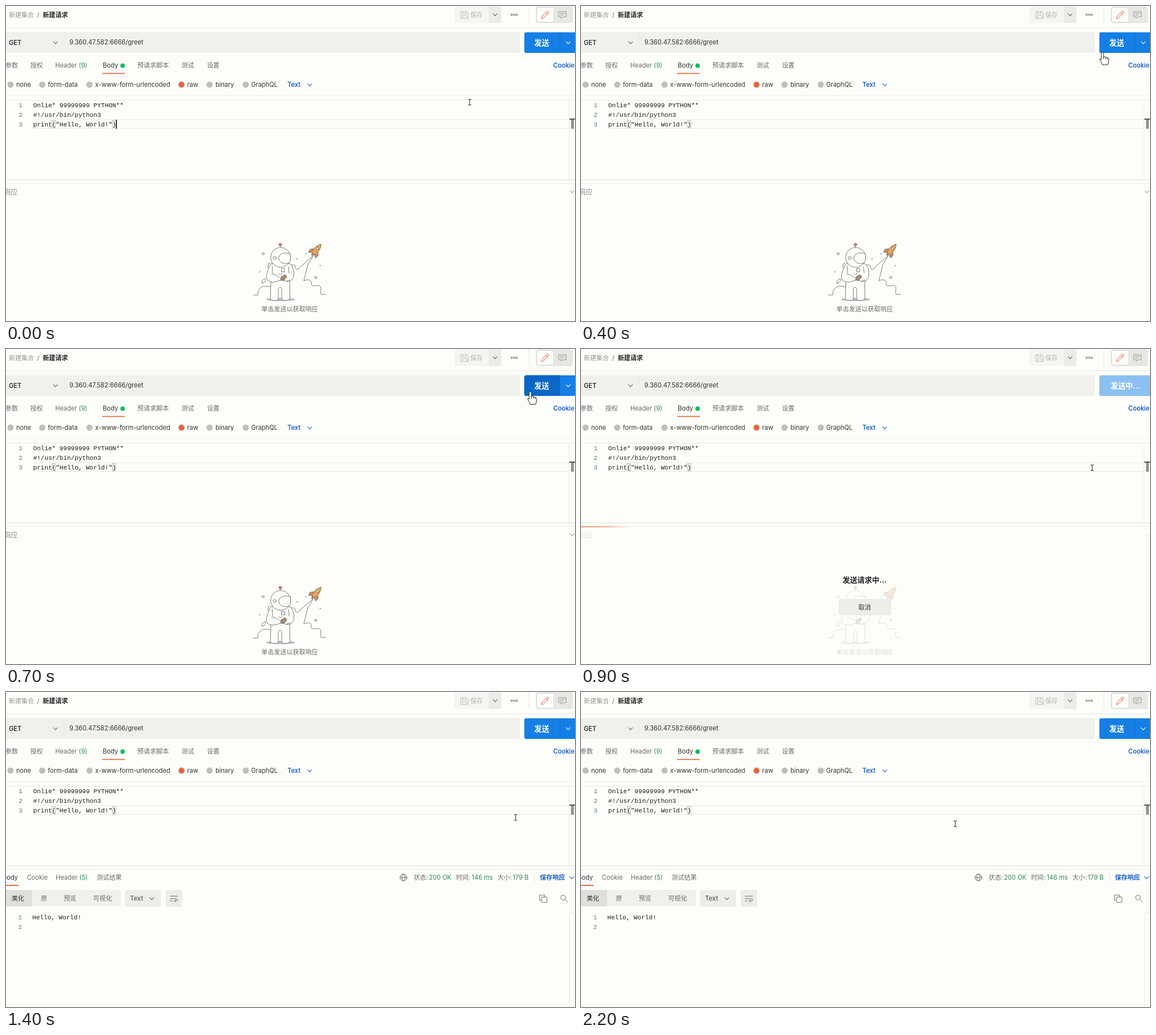
An HTML page for the animation above (2900 ms loop, 1005 by 557 pixels).

```html
<!DOCTYPE html>
<html lang="zh-CN">
<head>
<meta charset="utf-8">
<title>API request</title>
<style>
html, body { margin: 0; width: 100%; height: 100%; overflow: hidden; background: #fdfdfa; }
svg { display: block; width: 1005px; height: 557px; }
text { font: 11.1px Inter, "Noto Sans CJK SC", "Noto Sans CJK", sans-serif; fill: #6b6b6b; white-space: pre; }
.b { font-weight: 600; }
.dark { fill: #333; }
.pale { fill: #b4b4b2; }
.green { fill: #2f8a58; }
.blue { fill: #1b62c4; font-weight: 600; }
.code text { font-family: "Liberation Mono", "Noto Sans Mono", monospace; fill: #1c1c1c; }
.code .num { fill: #4b7f8c; }
.big { font-size: 13.2px; font-weight: 700; }
.white { fill: #fff; }
.mid { text-anchor: middle; }
.line { fill: none; stroke: #6b6b6b; stroke-width: 1; stroke-linecap: round; stroke-linejoin: round; }
.rule { fill: none; stroke: #e8e8e4; }
.field { fill: #f0f0ed; }
.accent { fill: #ea6a3c; }
.ink { fill: #fdfdfa; stroke: #6c6c6c; stroke-width: .9; stroke-linecap: round; stroke-linejoin: round; }
.open { fill: none; }
</style>
</head>
<body>
<svg viewBox="0 0 1005 557">
<defs>
  <path id="chev" d="M-3.5-1.8 0 1.8 3.5-1.8" fill="none" stroke-width="1.1" stroke-linecap="round" stroke-linejoin="round"/>
  <linearGradient id="glow">
    <stop offset="0" stop-color="#f2a58a"/>
    <stop offset=".45" stop-color="#f5b9a4"/>
    <stop offset="1" stop-color="#fdfdfa"/>
  </linearGradient>
</defs>

<!-- title row -->
<text x="5" y="20" style="fill:#969694">新建集合</text>
<text x="55" y="20">/</text>
<text x="65" y="20" class="b" style="fill:#222">新建请求</text>
<rect x="792" y="1" width="83" height="29" rx="3" fill="#f5f5f3"/>
<path d="M853 1h19a3 3 0 0 1 3 3v23a3 3 0 0 1-3 3h-19z" fill="#ebebe8"/>
<path class="line" style="stroke:#bcbcba" d="M803.500 10h10l3 3v9h-13zM806.500 10v4h6v-4M806 22v-5h8v5"/>
<text x="820" y="20" class="pale">保存</text>
<use href="#chev" x="864" y="15.500" stroke="#666"/>
<g class="line"><circle cx="893" cy="15.500" r="1.500"/><circle cx="897.500" cy="15.500" r="1.500"/><circle cx="902" cy="15.500" r="1.500"/></g>
<path class="rule" d="M923.500 0V30M0 38.500H1005"/>
<rect x="936.500" y="1.500" width="64" height="28" rx="3" fill="#e7e7e4" stroke="#dededb"/>
<rect x="937.500" y="2.500" width="30" height="26" rx="3" fill="#fdfdfa" stroke="#dcdcd9"/>
<path class="line" style="stroke:#e2613c" d="M946 22l1-4 8.500-8.500q1.500-1 2.500 0t0 2.500L949.500 21zM953.500 11.500l3 3"/>
<path class="line" style="stroke:#9a9a98" d="M976.500 10h13v9h-6l-3 3v-3h-4zM979 13h8M979 16h5"/>

<!-- address row -->
<rect x="-4" y="46" width="912" height="37" rx="3" class="field"/>
<path class="rule" d="M102.500 47v35"/>
<text x="5" y="69" class="b dark">GET</text>
<use href="#chev" x="87.500" y="65" stroke="#666"/>
<text x="112" y="68" class="dark">9.360.47.582:6666/greet</text>
<rect id="button" x="915.500" y="46.500" width="94" height="36.500" rx="3"/>
<g id="idle">
  <path id="hover" d="M918.500 46.500h59.500v36.500h-59.500a3 3 0 0 1-3-3V49.500a3 3 0 0 1 3-3z" fill="#0a67c8"/>
  <path d="M978.500 46.500v36.500" stroke="#1170d0"/>
  <text x="933" y="69.500" class="big white">发送</text>
  <use href="#chev" x="993" y="65" stroke="#fff"/>
</g>
<text id="busy" x="935.500" y="69.500" class="big white">发送中...</text>

<!-- request tabs -->
<text x="-1" y="109">参数</text>
<text x="43" y="109">授权</text>
<text x="87" y="109">Header <tspan class="green">(9)</tspan></text>
<text x="171" y="109" class="dark">Body</text>
<circle cx="206" cy="105.500" r="4" fill="#10c05c"/>
<rect x="170" y="118.500" width="40" height="1.700" class="accent"/>
<text x="232" y="109">预请求脚本</text>
<text x="310" y="109">测试</text>
<text x="355" y="109">设置</text>
<text x="966.500" y="109" class="blue">Cookie</text>
<g fill="#bebebb">
  <circle cx="8" cy="139" r="5.500"/><circle cx="64" cy="139" r="5.500"/><circle cx="147.500" cy="139" r="5.500"/>
  <circle cx="310" cy="139" r="6"/><circle cx="359.500" cy="139" r="5.500"/><circle cx="423.500" cy="139" r="5.500"/>
</g>
<circle cx="310" cy="139" r="4.600" fill="#f0602e"/>
<text x="18" y="143" class="dark">none</text>
<text x="74" y="143" class="dark">form-data</text>
<text x="157.500" y="143" class="dark">x-www-form-urlencoded</text>
<text x="320" y="143" class="dark">raw</text>
<text x="370" y="143" class="dark">binary</text>
<text x="433" y="143" class="dark">GraphQL</text>
<text x="497" y="143" class="blue">Text</text>
<use href="#chev" x="536.500" y="139.500" stroke="#1b62c4"/>

<!-- editor -->
<path class="rule" d="M0 158.500H1005" opacity=".6"/>
<path class="rule" d="M0 166.500H1005M994.500 167V307"/>
<path class="rule" d="M48 201H994M48 216.500H994"/>
<path class="rule" d="M0 307.500H1005" style="stroke:#dededb"/>
<path class="rule" d="M0 313.500H1005"/>
<g fill="#f3f6ee" stroke="#b8c2b4"><rect x="81.500" y="202.500" width="6" height="13"/><rect x="188" y="202.500" width="6" height="13"/></g>
<g class="code">
  <text x="22.500" y="179" class="num">1</text><text x="48" y="179">Onlie* 99999999 PYTHON**</text>
  <text x="22.500" y="195.500" class="num">2</text><text x="48" y="195.500">#!/usr/bin/python3</text>
  <text x="22.500" y="212.500" class="num">3</text><text x="48" y="212.500">print("Hello, World!")</text>
</g>
<path d="M995 199h10v2h-10z" fill="#555"/>
<path d="M998 201h5v16h-5z" fill="#929290"/>
<path id="caret" d="M195 201v16" stroke="#111" stroke-width="1.600"/>

<!-- empty response -->
<g id="empty">
  <text x="-5" y="333" style="font-size:12.800px;fill:#949492">响应</text>
  <use href="#chev" x="1000" y="328.500" stroke="#a4a4a2"/>
  <ellipse cx="485" cy="519" rx="26" ry="2.700" fill="#b7b6c4"/>
  <g class="ink">
    <path class="open" d="M437 511h8c-1-8 3-13 9-15 5-1 9-1 13 1M504 458c4-1 7 0 7 4 0 3 2 4 5 3l27-24M543 441l-10 17-7 28c4-2 10-3 12 0 3 4-1 8 4 9 6 0 11-3 14 2 1 5-2 10 1 13h8"/>
    <path d="M468 486l-1 29q0 5 4 5.500h6q4 0 4-5v-13q0-5 3-5t3 5v13q0 5 4 5h6q4-.5 4.500-5.500L501 485z"/>
    <path d="M468 456c-4 5-5 10-7 16-2 8-1 13 4 15 7 3 15 0 23-4 4 4 10 5 15 3 6-4 6-12 5-18-1-5-3-9-6-12z"/>
    <path class="open" d="M467 454l-4 2v7M470 459l1 13M499 461l1 11M469 474c6 0 10 3 14 6M495 487l7-3"/>
    <rect x="487" y="464" width="5" height="6"/>
    <path d="M486 479l7-4 3 4-6 7-5-3z" fill="#a98871"/>
    <path class="open" d="M482 473l3 3M486 472l1 3M484.500 424v4"/>
    <circle cx="484.500" cy="422" r="2.500" fill="#e98079"/>
    <circle cx="485" cy="444.500" r="17.500"/>
    <path d="M502 438c-7-2-14-2-18 2-4 5-2 11 3 14 5 2 10 2 14-1 2-5 2-10 1-15z"/>
    <circle cx="474.500" cy="445.500" r="2.700"/>
    <circle cx="454" cy="438" r="2"/>
    <circle cx="547" cy="480" r="2"/>
    <path d="M452 490c-1-4 2-7 6-8 1 4-1 8-6 8z"/>
    <g transform="translate(547.500 432) rotate(40)">
      <path d="M-4 0l-5 5 1 6 4-3zM4 0l5 5-1 6-4-3z" fill="#de8a5e"/>
      <path d="M0-14C5-8 5.500 1 3.500 8h-7C-5.500 1-5-8 0-14z" fill="#e9a555"/>
      <circle cy="-4" r="2"/>
      <path d="M-2 8l2 4 2-4z" fill="#de8a5e"/>
    </g>
  </g>
  <g fill="#777"><circle cx="448" cy="470" r="1"/><circle cx="514" cy="447" r="1"/><circle cx="530" cy="438" r="1"/><circle cx="555" cy="459" r="1"/></g>
  <text x="501" y="540" class="mid">单击发送以获取响应</text>
</g>

<g id="sending">
  <rect id="bar" y="313" width="95" height="2.500" fill="url(#glow)"/>
  <text x="501" y="413" class="big mid" style="fill:#222;font-size:13px">发送请求中...</text>
  <rect x="455" y="442" width="93" height="29" rx="3" fill="#ededea"/>
  <text x="501" y="460.500" class="mid dark">取消</text>
</g>

<!-- received response -->
<g id="result">
  <text x="-6" y="332" class="dark">Body</text>
  <rect y="341" width="22" height="2" class="accent"/>
  <text x="37" y="332">Cookie</text>
  <text x="88" y="332">Header <tspan class="green">(5)</tspan></text>
  <text x="160" y="332">测试结果</text>
  <g class="line"><circle cx="702" cy="328" r="6"/><ellipse cx="702" cy="328" rx="2.700" ry="6"/><path d="M696 328h12"/></g>
  <text x="720" y="332">状态:</text><text x="747" y="332" class="green">200 OK</text>
  <text x="795" y="332">时间:</text><text x="822.500" y="332" class="green">146 ms</text>
  <text x="868" y="332">大小:</text><text x="895" y="332" class="green">179 B</text>
  <path class="rule" d="M933.500 319v19M995.500 557V390.500H1005"/>
  <text x="943" y="332" class="blue">保存响应</text>
  <use href="#chev" x="999" y="328.500" stroke="#1b62c4"/>
  <rect x="-4" y="350" width="207" height="29" rx="3" class="field"/>
  <path d="M0 350h46v29H0z" fill="#dfdfdc"/>
  <text x="10" y="368.500" class="dark" style="font-weight:500">美化</text>
  <text x="61.500" y="368.500">原</text>
  <text x="102" y="368.500">预览</text>
  <text x="154" y="368.500">可视化</text>
  <rect x="210" y="350" width="63.500" height="30" rx="3" fill="#ededea"/>
  <text x="219" y="369" class="b">Text</text>
  <use href="#chev" x="257.500" y="365.500" stroke="#666"/>
  <rect x="282" y="350" width="29" height="30" rx="3" fill="#ededea"/>
  <path class="line" d="M290 361h13M290 365.500h10.500q2.500 0 2.500 2t-2.500 2H298M299.500 367.500l-2 2 2 2M290 369.500h4"/>
  <g class="line"><path d="M945 368h-2.500v-9h9v2.500"/><rect x="946" y="362.500" width="9.500" height="9.500" rx="1"/><circle cx="984" cy="363.500" r="4.300"/><path d="M987.500 367l4.500 4.500"/></g>
  <g class="code">
    <text x="21.500" y="402" class="num">1</text><text x="46.500" y="402">Hello, World!</text>
    <text x="21.500" y="418.500" class="num">2</text>
  </g>
</g>

<!-- pointer shapes, hot spot at 0,0 -->
<g id="pointer">
  <path id="beam" class="line" style="stroke:#222" d="M-2.500-5H-1L0-4.500l1-.5H2.500M0-4.500V4.500M-2.500 5H-1L0 4.500l1 .5H2.500"/>
  <path id="arrow" d="M0 0v16l3.700-3.500 2.500 6 2.300-1-2.500-5.800H11z" fill="#fff" stroke="#222"/>
  <path id="hand" d="M-2 1.500Q-2-.5 0-.5T2 1.500V8q3-1.500 3.500.800 2.500-1 3 .900 2.500-.500 2.500 2V16q0 3-2 6H0q-1-3-4-8-1-2 0-2.700 1-.5 2 1.700zM2 8v4M5.500 8.800V12M8.500 9.700V12.500" fill="#fff" stroke="#222" stroke-linejoin="round"/>
</g>
</svg>
<script>
const LOOP = 2900, STEP = 100, LAST = 2200;
const $ = id => document.getElementById(id);
const show = (id, on) => $(id).style.display = on ? "" : "none";
const linear = k => k;
const smooth = k => k * k * (3 - 2 * k);
const settle = k => 1 - (1 - k) ** 3;

// time, x, y, easing towards the next stop
const path = [
  [0, 819, 170, smooth], [400, 921, 82, settle], [700, 926, 76, linear],
  [900, 903, 210, linear], [1000, 901, 220, settle], [1800, 900, 222, smooth],
  [2200, 661, 233, linear]
];

function pointerAt(t) {
  const i = path.findLastIndex(p => p[0] <= t);
  const [t0, x0, y0, ease] = path[i];
  const [t1, x1, y1] = path[i + 1] || [t0 + 1, x0, y0];
  const k = ease((t - t0) / (t1 - t0));
  return [x0 + (x1 - x0) * k, y0 + (y1 - y0) * k];
}

function draw(now) {
  const t = Math.min(Math.floor(now % LOOP / STEP) * STEP, LAST);
  const [x, y] = pointerAt(t);
  const sending = t >= 800 && t < 1000;
  const onButton = x >= 915 && y >= 46 && y <= 83;
  const inEditor = y > 166;

  $("pointer").setAttribute("transform", `translate(${x} ${y})`);
  show("hand", onButton);
  show("beam", inEditor);
  show("arrow", !onButton && !inEditor);

  $("button").setAttribute("fill", sending ? "#8bc0f1" : "#157fe6");
  show("idle", !sending);
  show("busy", sending);
  show("hover", t >= 500 && t < 800);
  show("caret", t < 300);

  show("empty", t < 1000);
  $("empty").style.opacity = sending ? .22 : 1;
  show("sending", sending);
  $("bar").setAttribute("width", t < 900 ? 45 : 95);
  show("result", t >= 1000);
  requestAnimationFrame(() => draw(performance.now() - start));
}

const start = performance.now();
draw(0);
</script>
</body>
</html>
```
